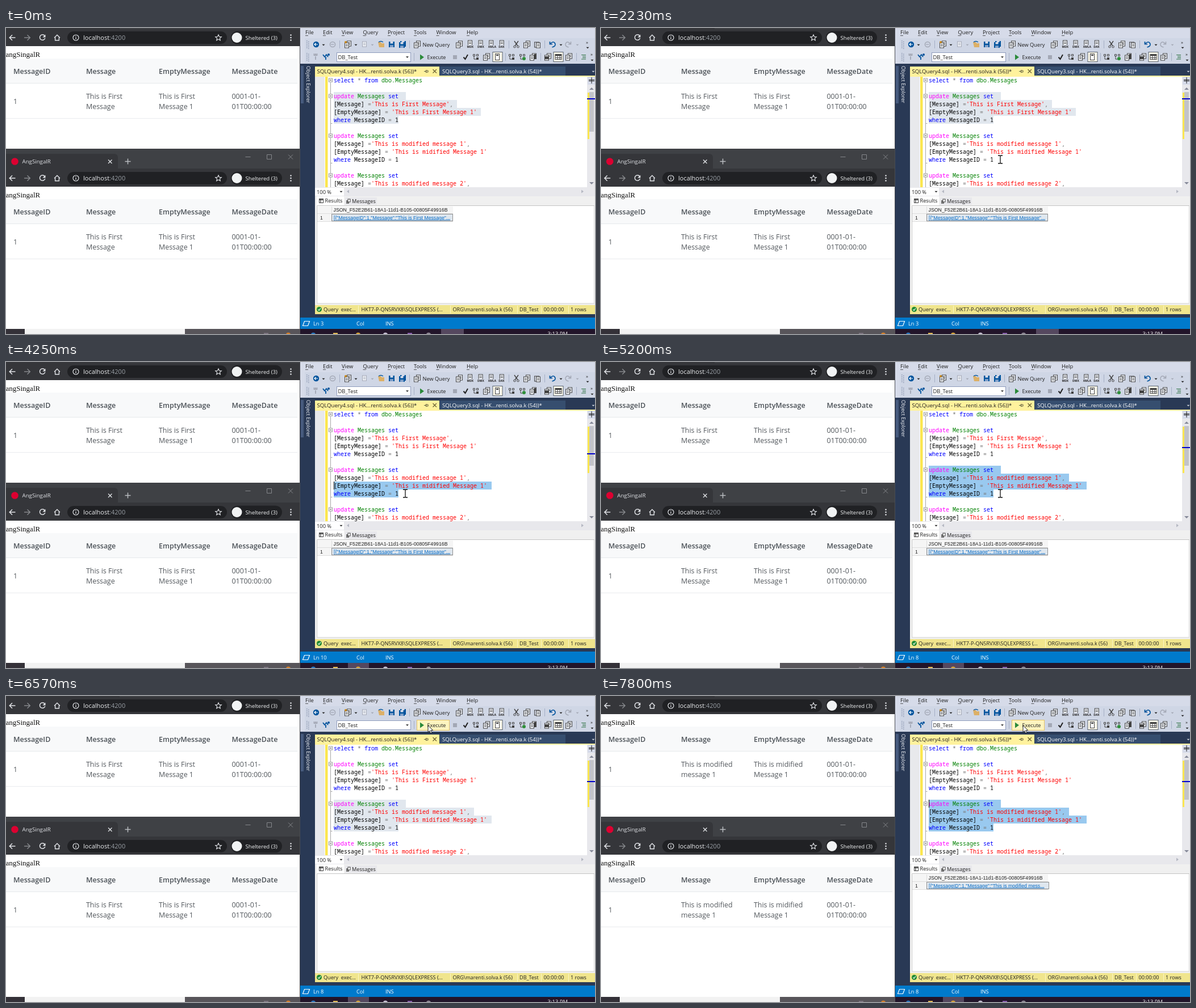
Write an HTML page that moves like this. It is 1037x540 px and loops after 8 s.

```html
<!DOCTYPE html>
<html lang="en">
<head>
<meta charset="utf-8">
<title>Live table update</title>
<style>
  html, body { margin: 0; width: 100%; height: 100%; overflow: hidden; background: #fff; }
  svg { display: block; width: 1037px; height: 540px; }
  text { white-space: pre; font-family: "Open Sans", "Noto Sans", sans-serif; }
  .code { font-family: "Noto Sans Mono", "DejaVu Sans Mono", monospace; }
  .grid { font-family: "Liberation Sans", Arial, sans-serif; }
  .serif { font-family: "Liberation Serif", serif; }
  .head { font-weight: 600; }
</style>
</head>
<body>
<svg id="stage" viewBox="0 0 1037 540" xmlns="http://www.w3.org/2000/svg"></svg>
<script>
const LOOP = 8000;
const NAVY = '#293955', INK = '#1e1e1e', BLUE = '#00539c', GRAY = '#a3a8b5', STRIP = '#3f4145';

// Drawing helpers, each returns SVG markup
const rect = (x, y, w, h, fill, extra = '') =>
  `<rect x="${x}" y="${y}" width="${w}" height="${h}" fill="${fill}" ${extra}/>`;
const text = (x, y, s, size, fill, extra = '') =>
  `<text x="${x}" y="${y}" font-size="${size}" fill="${fill}" ${extra}>${s}</text>`;
const line = (d, color, width = 1, extra = '') =>
  `<path d="${d}" fill="none" stroke="${color}" stroke-width="${width}" ${extra}/>`;
const shape = (d, fill) => `<path d="${d}" fill="${fill}"/>`;
const circle = (x, y, r, fill, extra = '') =>
  `<circle cx="${x}" cy="${y}" r="${r}" fill="${fill}" ${extra}/>`;
const group = (id, body, extra = '') => `<g id="${id}" ${extra}>${body}</g>`;
const down = (x, y, color = INK, r = 2.5) => shape(`M${x - r} ${y - r / 2}h${2 * r}l${-r} ${r}z`, color);

// ---- Browser windows ----
function cells(message, empty) {
  return [[141, message], [269, empty]].map(([x, lines]) =>
    lines.map((s, i) => text(x, 125 + i * 17.6, s, 12.4, '#53585d')).join('')).join('');
}

function browser(n, top) {
  const nav = '#e2e4e8';
  const heads = [[13, 'MessageID'], [141, 'Message'], [269, 'EmptyMessage'], [397.5, 'MessageDate']];
  return `<g transform="translate(0 ${top})">` +
    rect(0, 0, 518, 32, '#35363a') + rect(0, 32, 518, 251, '#fff') +
    line('M16.5 17H7M11 12.2L6.2 17l4.8 4.8', nav, 1.5) +
    line('M32 17h9.5M37.5 12.2l4.8 4.8-4.8 4.8', '#85878b', 1.5) +
    line('M68 13.5a4.8 4.8 0 1 0 .8 4.6', nav, 1.5) + shape('M69.5 11.5v5h-5z', nav) +
    line('M85 17.3l5-5 5 5M86.6 16.5v5.2h6.8v-5.2', nav, 1.4) +
    rect(108, 6, 281, 22, '#202124', 'rx="11"') +
    circle(123, 17, 5, 'none', `stroke="${nav}" stroke-width="1.2"`) + line('M123 16.3v3.5M123 13.8v1.3', nav, 1.3) +
    text(136, 21, 'localhost<tspan fill="#9aa0a6">:4200</tspan>', 11, '#eceef0') +
    line('M374 11.8l1.5 3.5 3.8.3-2.9 2.5.9 3.7-3.3-2-3.3 2 .9-3.7-2.9-2.5 3.8-.3z', nav, 1.1) +
    rect(396, 5.5, 90, 23, '#202124', 'rx="11.5"') + circle(406.5, 17, 9, '#f1f3f4') +
    text(421.5, 20.5, 'Sheltered (3)', 9.6, '#f1f3f4') +
    [12.5, 17, 21.5].map(y => circle(501.5, y, 1.3, nav)).join('') +
    text(-.5, 50.5, 'angSingalR', 13, '#111', 'class="serif"') +
    rect(0, 54, 513, 43, '#f8f9fa') + rect(0, 97, 513, 1, '#e6e9ec') + rect(0, 159, 513, 1, '#e9ebee') +
    heads.map(([x, s]) => text(x, 81, s, 12.5, '#4b5157', 'class="head"')).join('') +
    text(13, 134, '1', 12.4, '#53585d') +
    text(397.5, 125, '0001-01-', 12.4, '#53585d') + text(397.5, 142.6, '01T00:00:00', 12.4, '#53585d') +
    group('before' + n, cells(['This is First', 'Message'], ['This is First', 'Message 1'])) +
    group('after' + n, cells(['This is modified', 'message 1'], ['This is midified', 'Message 1'])) + '</g>';
}

function tabStrip() {
  return rect(0, 213, 518, 35, STRIP) + shape('M0 248V222H190q7 0 7 7v19z', '#35363a') +
    circle(15.5, 235.5, 6.3, '#dd0031') + text(28.5, 239, 'AngSingalR', 9.7, '#dfe1e5') +
    line('M180 232.5l6.5 6.5m0-6.5l-6.5 6.5', '#e2e4e8', 1.3) +
    line('M209.5 235.5h10M214.5 230.5v10', '#b9bcc0', 1.5) +
    line('M421.5 227.5h9M459.5 223.5h8v8h-8zM497 223.5l8 8m0-8l-8 8', '#85878b');
}

// ---- Query tool: menu and toolbars ----
const page = (x, y, color = '#424242') =>
  rect(x - 3.5, y - 5, 7, 9, '#eef1f7', `stroke="${color}"`) + line(`M${x - 2} ${y - 2}h4M${x - 2} ${y + .5}h4`, color);
const pages = (x, y, color) => page(x + 2, y - 1, color) + page(x - 2, y + 2, color);
const disk = (x, y) => rect(x - 5, y - 5, 10, 10, BLUE) + rect(x - 2.5, y - 5, 5, 3.5, '#d6dbe9') + rect(x - 3, y + 1, 6, 4, '#7f9fc9');
const tree = (x, y) => line(`M${x - 4.5} ${y - 4.5}h3v3h-3zM${x + 1.5} ${y - 4.5}h3v3h-3zM${x - 3} ${y - 1}v5h4`, '#424242') +
  rect(x + 1, y + 1, 4, 4, '#424242');
const grip = y => [0, 3, 6, 9, 12].map(d => rect(529, y - 7 + d, 1.5, 1.5, '#8f9ab3') + rect(532, y - 5.5 + d, 1.5, 1.5, '#8f9ab3')).join('');
const bar = (x, y) => rect(x, y - 7, 1, 14, '#a5afc6');
const boxed = (x, y) => rect(x - 8, y - 8.5, 17, 17, '#fffbea', 'stroke="#57606f"');

function toolbars() {
  const menu = [[527, 'File'], [558, 'Edit'], [591, 'View'], [628.5, 'Query'], [672, 'Project'], [718, 'Tools'], [757.5, 'Window'], [811, 'Help']];
  const a = 29, b = 51;
  return rect(518, 0, 519, 63, '#d6dbe9') + rect(526, 18, 511, 44, '#cfd6e5') +
    menu.map(([x, s]) => text(x, 11, s, 9.3, INK) + rect(x, 13, 5, .7, INK)).join('') +
    grip(a) + circle(546, a, 5.2, BLUE) + line('M549 29h-5.5M545.7 26.5L543 29l2.7 2.5', '#fff', 1.2) + down(559, a + 1) +
    circle(575, a, 4.6, 'none', `stroke="${GRAY}" stroke-width="1.5"`) + line('M572 29h5.5', GRAY, 1.3) + bar(587, a) +
    pages(602, a) + circle(598, 25, 2, '#c98a1b') + down(616, a + 1) + page(631, a, GRAY) + down(645, a + 1, GRAY) +
    shape('M655 25h5l1 2h5v7h-9z', '#dcb067') + line('M656 25q4-3 8 0', BLUE, 1.4) +
    disk(679, a) + disk(699, 28) + disk(697, 30) + bar(710, a) +
    pages(724, a) + text(733.5, 33, 'New Query', 9.2, INK) + pages(798, a) +
    ['MDX', 'DMX', 'XMLA', 'DAX'].map((s, i) => page(817 + i * 18.6, 27) +
      rect(811 + i * 18.6, 30, 12, 5, '#d6dbe9') + text(811.5 + i * 18.6, 35, s, 5, INK, 'font-weight="700"')).join('') + bar(885, a) +
    line('M895 23l5.5 8M902 23l-5.5 8', '#424242', 1.4) + circle(895.5, 33, 1.8, 'none', 'stroke="#424242"') + circle(901.5, 33, 1.8, 'none', 'stroke="#424242"') +
    pages(917, a) + rect(930.5, 25, 8, 9, '#d6dbe9', 'stroke="#424242"') + page(937, 31) + bar(948, a) +
    line('M957.5 24v4.5h4.5M958 28q6-6 8.5-1t-5 7', BLUE, 1.7) + down(977, a + 1) +
    line('M994.5 24v4.5h-4.5M994 28q-6-6-8.5-1t5 7', GRAY, 1.5) + down(1006, a + 1, GRAY) +
    text(1021, 28, '»', 8, INK) + down(1024, 35) +
    // second row
    grip(b) + line('M545 45v4m-2.5-4v3h5v-3M545 50v6', GRAY, 1.8) + line('M558 47l3 4 3-4 3 4M563 51v5', BLUE, 1.8) + circle(568, 47, 2, BLUE) +
    rect(582.5, 43.5, 130, 16, '#fff', 'stroke="#8e9bbc"') + text(584.5, 55, 'DB_Test', 9.4, INK) + down(706.5, b + .5) + bar(718, b) +
    group('hover', rect(723.5, 42.5, 57, 18, '#fdf4bf', 'id="hoverFill" stroke="#e5c365"')) +
    shape('M729 46.5l7 5-7 5z', '#2b8a3a') + text(741.5, 55, 'Execute', 9.1, INK) +
    rect(787, 48, 7, 7, GRAY) + line('M805.5 51.5l3 3.5 4.5-8', '#222', 2) +
    tree(827, b) + pages(846, b) + boxed(865, b) + rect(861.5, 45.5, 7, 11, '#fff', 'stroke="#424242"') + rect(863, 47, 4, 2, '#424242') + bar(879, b) +
    tree(890, b) + tree(909, b) + circle(912, 54, 3, '#2f8f3a') + pages(928, b) + rect(930, 46, 4, 9, '#424242') + bar(941, b) +
    pages(954, b) + rect(949, 50, 7, 5, '#424242') + boxed(972, b) + rect(967, 46.5, 11, 9, '#fff', 'stroke="#424242"') +
    line('M967 48h11', '#424242', 2.5) + line('M967 52.5h11M971 47v9M975 47v9', '#424242') + pages(991, b) + bar(1004, b) +
    line('M1013 47.5h8M1015 50h6M1015 52.5h6M1013 55h8', '#35764a', 1.2) + text(1029, 49, '»', 8, INK) + down(1032, 57);
}

// ---- Query tool: editor ----
function highlight(source) {
  const rules = [[/^'/, '#f00'], [/^(select|from|set|where)$/, '#00f'], [/^update$/, '#f0f'], [/^(dbo\.)?Messages$/, '#008000'], [/^[*=,]$/, '#777']];
  return source.replace(/'[^']*'|[\w.]+|[*=,]/g, token => {
    const rule = rules.find(([test]) => test.test(token));
    return rule ? `<tspan fill="${rule[1]}">${token}</tspan>` : token;
  });
}

const rowY = i => 92 + i * 14;
const statement = (a, b) => ['update Messages set', `[Message] ='${a}',`, `[EmptyMessage] = '${b}'`, 'where MessageID = 1', ''];
const source = ['select * from dbo.Messages', '',
  ...statement('This is First Message', 'This is First Message 1'),
  ...statement('This is modified message 1', 'This is midified Message 1'),
  ...statement('This is modified message 2', '').slice(0, 2)];
// Takes its fill from the surrounding group.
const selection = (row, right, id = '') =>
  `<rect x="577" y="${rowY(row) - 7}" width="${right - 577}" height="14" ${id && `id="${id}"`}/>`;

function editor() {
  const folds = [0, 2, 7, 12].map(i => {
    const y = rowY(i) + .5;
    return rect(568.5, y - 3.5, 6, 6, '#fff', 'stroke="#999"') + line(`M570 ${y - .5}h3`, '#444');
  }).join('');
  return rect(544, 86, 493, 195, '#fff') + rect(544, 86, 17, 195, '#e8e9ec') + rect(562, 86, 4.5, 195, '#fbe64f') +
    line('M571.5 96V281M571.5 168.5h3M571.5 238.5h3', '#a8a8a8') + folds +
    group('oldSelection', selection(2, 704) + selection(3, 794) + selection(4, 836) + selection(5, 691), 'fill="#e1e7ee"') +
    group('selection', selection(7, 704, 'sel7') + selection(8, 824, 'sel8') + selection(9, 855, 'sel9') + selection(10, 691, 'sel10')) +
    rect(576.5, 225.5, 445, 13, 'none', 'id="currentLine" stroke="#e3e3e9"') +
    source.map((s, i) => text(577, rowY(i) + 4, highlight(s), 10, '#000', 'class="code"')).join('') +
    rect(691, 225, 1, 14, '#000', 'id="endCaret"') + rect(577, 183, 1, 14, '#000', 'id="startCaret"') +
    // scroll bars and zoom
    rect(1023, 86, 14, 195, '#e8e8ec') + rect(1024, 86, 13, 14, '#d6dbe9') +
    line('M1026 91.5h10M1026 93.5h10M1031 87v11', INK) + shape('M1027 109l4-4 4 4z', '#868999') + shape('M1027 272l4 4 4-4z', '#868999') +
    rect(1027, 113, 8, 70, '#c2c3c9') + rect(1024, 114, 3, 82, '#fbe64f') + rect(1023, 124, 14, 2, '#0000cd', 'id="mark"') +
    rect(544, 281, 493, 16, '#e8e8ec') + rect(544, 282, 51, 14, '#fff') + text(547, 292.5, '100 %', 9.3, INK) + down(590, 289) +
    shape('M604 285.5v6l-4-3z', '#b5b8c2') + shape('M1013 285.5v6l4-3z', '#b5b8c2');
}

function results() {
  const json = (s, right) => rect(573.5, 328.5, right - 574, 12, '#dfe7ef', 'stroke="#909090"') +
    text(577, 337.5, `[{"MessageID":1,"Message":"${s}...`, 8.73, '#0a6cc4', 'class="grid" text-decoration="underline"');
  return rect(544, 297, 493, 192, '#f0f0f0') + rect(547, 297, 48, 16, '#fff') + rect(597, 299, 56, 13, '#e8e8ec') +
    rect(551.5, 301.5, 7, 7, '#fff', 'stroke="#424242"') + line('M551 303h8M554 302v7', '#424242', 1.3) + text(561.5, 308.3, 'Results', 9.2, INK) +
    rect(599, 304, 5, 6, '#777') + rect(602, 302, 4, 5, '#fff', 'stroke="#424242"') + text(609, 309, 'Messages', 9.2, INK) +
    rect(546, 313, 491, 173, '#fff') + line('M547.5 486V313.5H1036', '#c4c4c4') + line('M1035.5 314V486H547', '#d2d2d2') +
    group('grid', rect(548, 315, 239, 13, '#f5f5f5') + rect(548, 328, 25, 13, '#f5f5f5') + line('M548 341.5h239M548 327.5h239M573.5 315v27', '#dedede') +
      text(576.5, 324, 'JSON_F52E2B61-18A1-11d1-B105-00805F49916B', 8.78, INK, 'class="grid"') + text(553, 337.5, '1', 8.8, INK, 'class="grid"') +
      group('jsonBefore', json('This is First Message"', 787)) + group('jsonAfter', json('This is modified mess', 789)));
}

function statusBars() {
  const info = [[559, 'Query&#160; exec...'], [625.5, 'HKT7-P-QN5RVX8\\SQLEXPRESS (...'], [786.5, 'ORG\\marenti.solva.k (56)'], [904, 'DB_Test'], [946.5, '00:00:00'], [994, '1 rows']];
  const icons = [[458, '#7c7480'], [497, '#d9822b'], [541, '#2b79c2'], [580, '#e5bd57'], [620, '#d8a53a'], [668, '#c9c4d6'], [711, '#8a5fb0'], [744, '#8d8794']];
  return rect(544, 489, 493, 16, '#f0e58d') + circle(551.5, 496.5, 4.5, '#1f8a34') + line('M549.5 496.5l1.5 2 3-4', '#fff', 1.2) +
    info.map(([x, s]) => text(x, 500, s, 9.1, INK)).join('') +
    [620, 782, 900, 942, 990].map(x => rect(x, 490, 1, 14, '#fbf5c4')).join('') +
    rect(518, 511, 519, 20, '#007acc') + line('M525.5 517.5h9l-3 8h-9z', '#fff', 1.2) +
    [3, 11, 10, 9, 8].map(n => text(541, 524.5, 'Ln ' + n, 9.3, '#fff', `id="ln${n}"`)).join('') +
    text(617, 524.5, 'Col', 9.3, '#fff') + text(668, 524.5, 'INS', 9.3, '#fff') +
    rect(0, 531, 1037, 9, '#22152a') + rect(0, 531, 33, 9, '#343138') + rect(33, 531, 282, 9, '#f2f2f2') + rect(315, 531, 203, 9, '#58555a') +
    rect(766, 531, 40, 9, '#55485f', 'id="taskBefore"') + rect(602, 531, 37, 9, '#55485f', 'id="taskAfter"') +
    icons.map(([x, c], i) => i % 3 ? circle(x, 542, 4.5, c) : rect(x - 4, 538, 8, 3, c)).join('') +
    text(953.5, 543, '3:13 PM', 9.5, '#eee');
}

const queryTool = rect(518, 0, 519, 531, NAVY) + rect(517, 0, 1, 531, '#4a4c52') + toolbars() +
  rect(519, 67, 5, 66, '#465a7d') + `<g transform="translate(529 67) rotate(90)">${text(0, 0, 'Object Explorer', 9.1, '#f4f6fa')}</g>` +
  rect(544, 68, 219, 17, '#fff29d') + rect(764, 68, 221, 16, '#364e6f') + rect(544, 84, 493, 2, '#fff29d') +
  text(547.5, 80, 'SQLQuery4.sql - HK...renti.solva.k (56))*', 9.6, INK) + line('M736 76.5h3M739.5 74v5M740 75h3v3h-3', '#5d5a3a') +
  line('M751.5 73l6.5 6.5m0-6.5l-6.5 6.5', '#6b6336', 1.3) +
  text(768, 80, 'SQLQuery3.sql - HK...renti.solva.k (54))*', 9.6, '#fff') + down(1034, 77, '#ced4dd') +
  editor() + results() + statusBars();

const pointer = group('cursor',
  group('arrow', '<path d="M0 0v12l2.8-2.6 1.9 4.4 2-.9-1.9-4.3h4z" fill="#fff" stroke="#111" stroke-width=".9"/>') +
  group('ibeam', line('M-4 -7h3l1 1 1-1h3M-4 7h3l1-1 1 1h3M0 -6V6', '#111', 1.3)));

document.getElementById('stage').innerHTML =
  rect(0, 0, 1037, 540, '#fff') + browser(1, 0) + rect(200, 0, 318, 2, STRIP) + browser(2, 248) + tabStrip() + queryTool + pointer;

// ---- Timeline ----
// Plays [time, value] pairs as hard steps.
function play(id, prop, table) {
  const frames = table.map(([t, value]) => ({ offset: t / LOOP, [prop]: value, easing: 'steps(1, end)' }));
  frames.push({ offset: 1, [prop]: table.at(-1)[1] });
  document.getElementById(id).animate(frames, { duration: LOOP, iterations: Infinity });
}

const show = (id, ...ranges) => {
  const table = ranges.flatMap(([from, to = LOOP]) => to < LOOP ? [[from, 1], [to, 0]] : [[from, 1]]);
  play(id, 'opacity', ranges[0][0] ? [[0, 0], ...table] : table);
};

const at = (x, y) => `translate(${x.toFixed(1)}px, ${y.toFixed(1)}px)`;

// Spreads count steps evenly over a polyline.
function sweep(from, to, count, points) {
  return Array.from({ length: count }, (_, i) => {
    const k = i / (count - 1), p = k * (points.length - 1);
    const j = Math.min(Math.floor(p), points.length - 2), f = p - j;
    const mix = axis => points[j][axis] + (points[j + 1][axis] - points[j][axis]) * f;
    return [from + (to - from) * k, at(mix(0), mix(1))];
  });
}

play('cursor', 'transform', [
  [0, at(980, 560)],
  ...sweep(70, 840, 11, [[977, 532], [870, 400], [765, 295], [739, 263]]),
  [920, at(740, 261)], [1010, at(739, 260)],
  ...sweep(1300, 2080, 11, [[727, 202], [716, 181], [706, 206], [704, 238]]),
  [2160, at(704, 235)], [2230, at(703, 232)],
  ...sweep(5200, 5760, 8, [[703, 232], [742, 57]]),
  ...sweep(5840, 6000, 3, [[742, 56], [743, 52]])
]);
show('arrow', [0, 920], [5680]);
show('ibeam', [920, 5680]);

show('taskBefore', [0, 2550]);
show('taskAfter', [2550]);
show('oldSelection', [0, 2550]);
show('currentLine', [2550, 3880]);
show('endCaret', [2640, 3020], [3560, 3880]);

const climb = [[3880, 10], [4250, 9], [4480, 8], [4650, 7]];
climb.forEach(([t, row]) => show('sel' + row, [t]));
play('startCaret', 'transform', [[0, at(0, 0)], ...climb.map(([t, row]) => [t, at(0, (row - 7) * 14)])]);
show('startCaret', [3880, 5200], [5730, 6230], [6880, 7250], [7800]);
play('selection', 'fill', [[0, '#99c9ef'], [6310, '#e1e7ee'], [6880, '#99c9ef']]);

const lines = [[0, 3], [2640, 11], [4250, 10], [4480, 9], [4650, 8]];
lines.forEach(([t, n], i) => show('ln' + n, [t, lines[i + 1]?.[0]]));
play('mark', 'transform', lines.map(([t, n]) => [t, at(0, Math.round((n - 3) * 5.25))]));

show('hover', [5760]);
play('hoverFill', 'fill', [[0, '#fdf4bf'], [6230, '#fbe79a'], [6400, '#fdf4bf']]);
show('grid', [0, 6310], [6880]);
show('jsonBefore', [0, 6310]);
show('jsonAfter', [6880]);
for (const n of [1, 2]) {
  show('before' + n, [0, 6800]);
  show('after' + n, [6800]);
}
</script>
</body>
</html>
```
